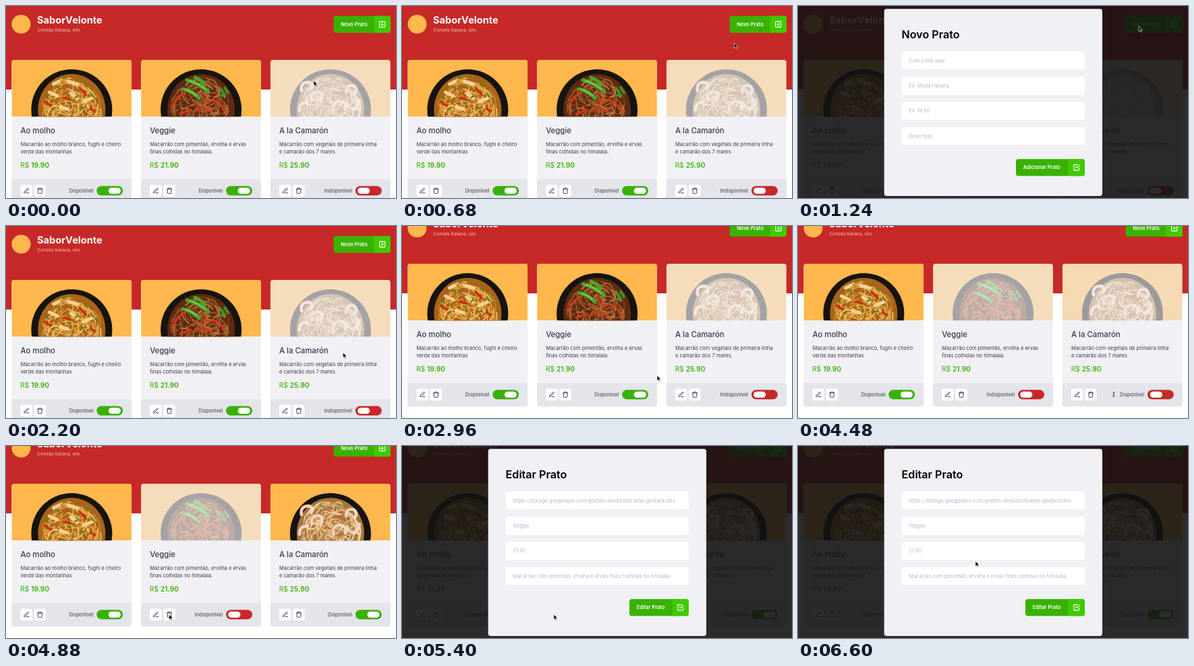
These frames come from a looping animation (578 px wide and 285 px high, 6.64 s). An HTML page:

```html
<!DOCTYPE html>
<html lang="pt">
<head>
<meta charset="utf-8">
<title>Pratos</title>
<style>
  html, body { margin: 0; width: 100%; height: 100%; overflow: hidden; background: #fff; }
  svg { display: block; width: 100vw; height: 100vh; }
  text { font-family: Inter, "Open Sans", sans-serif; white-space: pre; }
</style>
</head>
<body>
<svg id="stage" viewBox="0 0 578 285"></svg>
<script>
const LOOP = 6640;
const INK = '#3d3d4d', GREEN = '#39b100', LIME = '#41c900', RED = '#c72828', MUTED = '#b7b7cc';
const CARD = 177.7, STEP = 191.75, MARGIN = 8.4;

const ICONS = {
  edit: 'M12 20h9M16.5 3.5a2.1 2.1 0 0 1 3 3L7 19l-4 1 1-4z',
  trash: 'M3 6h18M19 6v14a2 2 0 0 1-2 2H7a2 2 0 0 1-2-2V6M8 6V4a2 2 0 0 1 2-2h4a2 2 0 0 1 2 2v2',
  plus: 'M5 3h14a2 2 0 0 1 2 2v14a2 2 0 0 1-2 2H5a2 2 0 0 1-2-2V5a2 2 0 0 1 2-2zM12 8v8M8 12h8',
  check: 'M9 11l3 3L22 4M21 12v7a2 2 0 0 1-2 2H5a2 2 0 0 1-2-2V5a2 2 0 0 1 2-2h11'
};

const rect = (x, y, w, h, fill, r = 0, extra = '') =>
  `<rect x="${x}" y="${y}" width="${w}" height="${h}" rx="${r}" fill="${fill}" ${extra}/>`;
const text = (x, y, size, str, fill = INK, weight = 400, extra = '') =>
  `<text x="${x}" y="${y}" font-size="${size}" fill="${fill}" font-weight="${weight}" ${extra}>${str}</text>`;
const stroke = (d, color, width) =>
  `<path d="${d}" fill="none" stroke="${color}" stroke-width="${width}" stroke-linecap="round" stroke-linejoin="round"/>`;
const icon = (name, cx, cy, size, color) =>
  `<g transform="translate(${cx - size / 2} ${cy - size / 2}) scale(${size / 24})">${stroke(ICONS[name], color, 2.4)}</g>`;

function button(x, y, right, label) {
  const split = right - 24.5;
  return rect(x, y, right - x, 25, GREEN, 3.5) +
    `<path d="M${split} ${y}H${right - 3.5}q3.5 0 3.5 3.5v18q0 3.5-3.5 3.5H${split}z" fill="${LIME}"/>` +
    text(x + 10.7, y + 15.2, 7.4, label, '#fff', 600) +
    icon(label === 'Novo Prato' ? 'plus' : 'check', right - 12.3, y + 12.5, 11, '#fff');
}

function random(seed) {
  return () => (seed = (seed * 16807) % 2147483647) / 2147483647;
}

const dishes = [
  { title: 'Ao molho', price: '19.90',
    lines: ['Macarrão ao molho branco, fughi e cheiro', 'verde das montanhas'],
    base: '#a8641a', noodles: ['#e0a040', '#c98228', '#f0c468', '#a65f18', '#e8b04c'],
    toppings: [
      ['M56 48l11 5M84 32l14 4M106 62l14-6M72 70l11 3M88 50l9 7M62 36l8-4', '#f3d290', 5],
      ['M49 62l9 6M101 42l9 9M77 56l10 3M117 72l6 5', '#c5300f', 3.5],
      ['M67 39l5 4M94 56l5-3M118 50l3 5M60 74l4-3M83 63l4 2M104 72l6-2M76 27l5-1M52 53l2 5M108 36l4 3', '#5b7f1e', 2.6]
    ] },
  { title: 'Veggie', price: '21.90',
    lines: ['Macarrão com pimentão, ervilha e ervas', 'finas colhidas no himalaia.'],
    base: '#5e2a12', noodles: ['#a55c2c', '#84421d', '#c07a3e', '#5c2a12', '#b4602c'],
    toppings: [
      ['M48 66q8-14 18-18M106 60q12 2 16 14M82 74q12-6 20 2M58 80l16-6M92 58l10 4', '#d03a1a', 3],
      ['M68 30q16 4 32 17M62 43q14 3 24 14M80 26q10 4 14 10', '#42a82a', 5],
      ['M72 31q13 4 24 13M66 44q10 3 16 9', '#86d455', 1.5],
      ['M117 42l5 8M124 41l5 8M118 53l6-1', '#3a982c', 3.5]
    ] },
  { title: 'A la Camarón', price: '25.90',
    lines: ['Macarrão com vegetais de primeira linha', 'e camarão dos 7 mares.'],
    base: '#a67440', noodles: ['#e6c68c', '#cf9c5c', '#f4e0b4', '#b98448', '#ebc48c'],
    toppings: [
      ['M46 46q-2-13 11-13q9 4 3 10M61 60q-2-12 9-13q10 3 5 12M112 48q-1-12 11-10q8 6 1 13M93 75q-3-12 9-14q12 2 10 12M43 75q0-13 12-12M122 73q9-3 10-13', '#f6d6c2', 4.5],
      ['M44 46q-2-15 13-15M59 60q-2-14 11-15M110 48q-1-14 13-12M91 75q-3-14 11-16', '#dc8a60', 1.2],
      ['M80 37l7 3M100 51l6-3M82 64l6 3', '#d2573c', 2.6],
      ['M73 31l5 2M91 57l4 3M108 32l3 4', '#6f8b3a', 2.2]
    ] }
];

function bowl(dish, i) {
  const rnd = random(71 + i * 137);
  let s = '<circle cx="89" cy="74" r="60" fill="#17130f"/>' +
    `<ellipse cx="89" cy="74" rx="50" ry="53" fill="${dish.base}"/>`;
  for (let n = 0; n < 170; n++) {
    const a = rnd() * Math.PI * 2, r = Math.sqrt(rnd());
    const x = 89 + 44 * r * Math.cos(a), y = 74 + 48 * r * Math.sin(a);
    // strands near the edge follow the rim
    const turn = r > 0.75 ? a * 180 / Math.PI + 90 : rnd() * 360;
    const len = 6 + rnd() * 9, bend = r > 0.75 ? -5 : 3 + rnd() * 8;
    s += `<g transform="translate(${x.toFixed(1)} ${y.toFixed(1)}) rotate(${turn.toFixed(0)})">` +
      stroke(`M${-len} ${-bend / 2}Q0 ${bend} ${len} ${-bend / 2}`, dish.noodles[n % 5], 1.1 + rnd()) + '</g>';
  }
  return s + dish.toppings.map(t => stroke(...t)).join('');
}

function card(dish, i) {
  return `<g transform="translate(${MARGIN + STEP * i} 80)">` +
    rect(0, 0, CARD, 212, '#f0f0f5', 4) +
    `<g id="photo${i}" clip-path="url(#photoClip)">${rect(0, 0, CARD, 84.2, '#ffb84d')}${bowl(dish, i)}</g>` +
    text(13, 109, 11.4, dish.title, INK, 500) +
    dish.lines.map((line, n) => text(13, 128 + 11 * n, 7.5, line)).join('') +
    text(12.8, 160, 10.2, `R$ <tspan font-weight="600">${dish.price}</tspan>`, GREEN) +
    `<path d="M0 177h${CARD}v31q0 4-4 4H4q-4 0-4-4z" fill="#e4e4eb"/>` +
    ['edit', 'trash'].map((name, n) =>
      rect(13 + 20.2 * n, 185.5, 17.5, 17.5, '#fff', 3) + icon(name, 21.8 + 20.2 * n, 194.2, 9.8, INK)).join('') +
    text(121.2, 197, 7.35, '', INK, 400, `id="label${i}" text-anchor="end"`) +
    rect(126, 187.3, 38.8, 14, GREEN, 7, `id="track${i}"`) +
    rect(143.5, 189.8, 18, 9, '#fff', 4.5, `id="thumb${i}"`) + '</g>';
}

function modal(id, title, fields, buttonLeft, label) {
  return `<g id="${id}">` + rect(0, 0, 578, 285, '#121214', 0, 'opacity=".89"') +
    rect(127.7, 4.3, 323.3, 277.7, '#f0f0f5', 4) +
    text(153.6, 47.6, 16.1, title, '#000', 600) +
    fields.map((field, n) => rect(154, 67.6 + 37.3 * n, 271, 27, '#fff', 4) +
      `<g clip-path="url(#valueClip)">${text(164.3, 83.7 + 37.3 * n, 7.4, field, MUTED)}</g>`).join('') +
    button(buttonLeft, 227.2, 425, label) + '</g>';
}

const stage = document.getElementById('stage');
stage.innerHTML = `<defs>
    <clipPath id="photoClip"><path d="M0 84.2V4q0-4 4-4h${CARD - 8}q4 0 4 4v80.2z"/></clipPath>
    <clipPath id="valueClip"><rect x="164" y="60" width="250" height="160"/></clipPath>
  </defs>` +
  rect(0, 0, 578, 285, '#fff') +
  '<g id="page">' + rect(0, 0, 578, 124, RED) +
  '<circle cx="22.5" cy="27" r="14" fill="#ffb84d"/>' +
  text(46, 25.6, 14.6, 'SaborVelonte', '#fff', 700) +
  text(46.3, 38, 6.65, 'Comida Italiana, sim.', '#f3c3ae') +
  button(485.5, 14.7, 570, 'Novo Prato') +
  dishes.map(card).join('') + '</g>' +
  modal('create', 'Novo Prato', ['Cole o link aqui', 'Ex: Moda Italiana', 'Ex: 19.90', 'Descrição'], 323, 'Adicionar Prato') +
  modal('update', 'Editar Prato', [
    'https://storage.googleapis.com/golden-wind/bootcamp-gostack/des', 'Veggie', '21.90',
    'Macarrão com pimentão, ervilha e ervas finas colhidas no himalaia.'], 337, 'Editar Prato') +
  '<path id="arrow" d="M0 0v7.6l1.8-1.6 1.2 2.8 1.4-.6-1.2-2.7h2.4z" fill="#000" stroke="#fff" stroke-width=".6"/>' +
  `<g id="beam">${stroke('M-1.3-3.4q1.3 0 1.3 1v4.8q0 1-1.3 1M1.3-3.4q-1.3 0-1.3 1v4.8q0 1 1.3 1', '#444', 0.8)}</g>`;

const el = id => document.getElementById(id);
const clamp = v => Math.max(0, Math.min(1, v));
const ease = v => { v = clamp(v); return v * v * (3 - 2 * v); };
const ramp = (t, from, to) => ease((t - from) / (to - from));
const mix = (a, b, k) => a + (b - a) * k;

// time, x, y of the pointer
const route = [
  [0, 456, 111], [240, 457, 109], [960, 510, 28], [1240, 505, 30], [1480, 505, 34],
  [1960, 499.5, 188], [2240, 499.5, 188], [2880, 378, 222], [3040, 378, 222], [3480, 346, 250],
  [3720, 346, 250], [4160, 536, 250], [4320, 536, 250], [4480, 468, 250], [4960, 224, 250],
  [5480, 225, 250], [6120, 262, 172], [6600, 263, 171]
];

function pointerAt(t) {
  const n = route.findIndex(p => p[0] > t);
  if (n < 0) return route[route.length - 1].slice(1);
  const a = route[n - 1], b = route[n], k = ramp(t, a[0], b[0]);
  return [mix(a[1], b[1], k), mix(a[2], b[2], k)];
}

function setAvailable(i, k, available) {
  el('photo' + i).setAttribute('opacity', mix(0.35, 1, k));
  el('label' + i).textContent = available ? 'Disponível' : 'Indisponível';
  el('thumb' + i).setAttribute('x', mix(129.2, 143.5, k));
  el('track' + i).setAttribute('fill',
    `rgb(${mix(199, 57, k)},${mix(40, 177, k)},${mix(40, 0, k)})`);
}

const show = (id, on) => el(id).setAttribute('visibility', on ? 'visible' : 'hidden');

function draw(t) {
  el('page').setAttribute('transform', `translate(0 ${-24 * ramp(t, 2700, 2920)})`);
  setAvailable(0, 1, true);
  setAvailable(1, 1 - ramp(t, 3600, 3880), t < 3600);
  setAvailable(2, ramp(t, 4440, 4720), t >= 4440);
  show('create', t >= 1120 && t < 2120);
  show('update', t >= 5280);

  const [x, y] = pointerAt(t), overText = t >= 4440 && t < 4540;
  for (const id of ['arrow', 'beam']) {
    el(id).setAttribute('transform', `translate(${x} ${y})`);
    show(id, (id === 'beam') === overText);
  }
}

const start = performance.now();
function frame() {
  draw((performance.now() - start) % LOOP);
  requestAnimationFrame(frame);
}
frame();
</script>
</body>
</html>
```
